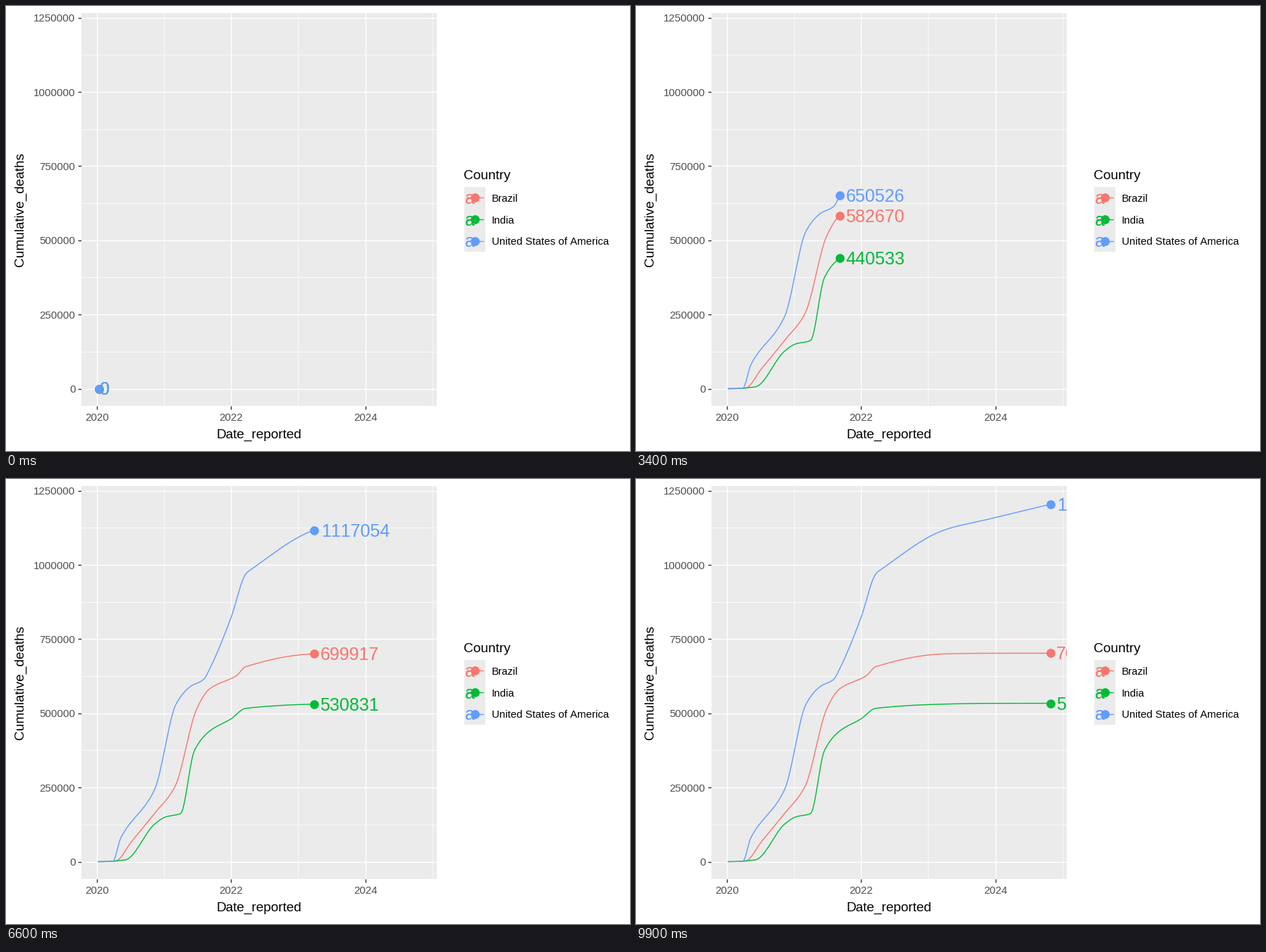
Animation of 885x632 px, one loop 10000 ms. Source, as a matplotlib script:

```python
import matplotlib.pyplot as plt
import numpy as np
from matplotlib.animation import FuncAnimation

W, H, DPI = 885, 632, 100
FRAMES, INTERVAL = 100, 100
LEFT, RIGHT, TOP, BOTTOM = 107, 610.5, 9.5, 568
X_2020, YEAR = 129.0, 95.15
Y_ZERO, Y_STEP = 543.5, 105.4
START, END, WEEK = 130.4, 587.5, 1.823
HEAD_0, SPEED = 132.0, 46.2
SMALL, MEDIUM, LARGE, DOT = 15, 19, 25, 12.7

plt.rcParams["font.family"] = "Liberation Sans"
plt.rcParams["text.kerning_factor"] = 6

# Key points per country: (seconds into the loop, thousands of deaths)
COUNTRIES = [
    ("Brazil", "#F8766D", [
        (0, 0), (0.5, 2), (1, 68), (1.7, 162.015), (2.33, 253), (3, 515),
        (3.4, 582.67), (4.22, 627), (4.5, 656.798), (6.6, 699.917),
        (7.9, 702.116), (9.9, 702.2)]),
    ("India", "#00BA38", [
        (0, 0), (0.8, 6), (1.7, 126.121), (2.05, 151), (2.5, 162),
        (2.93, 375), (3.4, 440.533), (4.05, 481), (4.5, 516.479),
        (6.6, 530.831), (7.9, 533.295), (9.9, 533.6)]),
    ("United States of America", "#619CFF", [
        (0, 0), (0.42, 1), (0.67, 81), (1.7, 241.719), (2.36, 530),
        (2.8, 590), (3.2, 613), (3.4, 650.526), (4.05, 822), (4.5, 968.691),
        (4.7, 987), (6.6, 1117.054), (7.9, 1152.08), (9.9, 1205)]),
]


def monotone(points):
    """Rising cubic curve through the points, flat before the first."""
    x, y = np.array(points, float).T
    h = np.diff(x)
    d = np.diff(y) / h
    mean = 2 * d[:-1] * d[1:] / (d[:-1] + d[1:])
    m = np.concatenate(([0], mean, [d[-1]]))

    def curve(q):
        q = np.clip(q, x[0], x[-1])
        i = np.clip(np.searchsorted(x, q) - 1, 0, len(h) - 1)
        t = (q - x[i]) / h[i]
        s = 1 - t
        return (s * s * (1 + 2 * t) * y[i] + t * t * (3 - 2 * t) * y[i + 1]
                + h[i] * t * s * (s * m[i] - t * m[i + 1]))

    return curve


def pt(px):
    return px * 72 / DPI


def to_y(thousands):
    return Y_ZERO - thousands / 250 * Y_STEP


fig = plt.figure(figsize=(W / DPI, H / DPI), dpi=DPI, facecolor="white")


def pixel_axes(left, right, top, bottom):
    ax = fig.add_axes([left / W, 1 - bottom / H,
                       (right - left) / W, (bottom - top) / H])
    ax.set(xlim=(left, right), ylim=(bottom, top), xticks=[], yticks=[])
    for spine in ax.spines.values():
        spine.set_visible(False)
    return ax


page = pixel_axes(0, W, 0, H)
panel = pixel_axes(LEFT, RIGHT, TOP, BOTTOM)
panel.set_facecolor("#EBEBEB")


def segment(ax, xs, ys, color, px=1.4, z=2):
    return ax.plot(xs, ys, color=color, lw=pt(px), zorder=z,
                   solid_capstyle="butt")[0]


def write(ax, x, y, s, px, color="black", **kw):
    return ax.text(x, y, s, fontsize=pt(px), color=color, va="baseline", **kw)


def dot(ax, x, y, color, z):
    return ax.plot([x], [y], "o", ms=pt(DOT), mew=0, color=color, zorder=z)[0]


def draw_axes():
    for k in range(6):
        x = X_2020 + k * YEAR
        y = Y_ZERO - k * Y_STEP
        major = k % 2 == 0
        segment(panel, [x, x], [TOP, BOTTOM], "white", 1.4 if major else 0.8)
        segment(panel, [LEFT, RIGHT], [y, y], "white")
        if k < 5:
            mid = y - Y_STEP / 2
            segment(panel, [LEFT, RIGHT], [mid, mid], "white", 0.8, 1.5)
        segment(page, [102.3, LEFT + 0.5], [y, y], "#333333")
        write(page, 98.5, y + 5.8, str(k * 250000), SMALL, "#4D4D4D",
              ha="right")
        if major:
            segment(page, [x, x], [BOTTOM, 573], "#333333")
            write(page, x, 589, str(2020 + k), SMALL, "#4D4D4D", ha="center")
    write(page, 358.4, 614.2, "Date_reported", MEDIUM, ha="center")
    write(page, 24.6, 289, "Cumulative_deaths", MEDIUM, ha="center",
          rotation=90, rotation_mode="anchor")


def draw_legend():
    write(page, 648.8, 246.3, "Country", MEDIUM)
    page.add_patch(plt.Rectangle((649.5, 257), 30, 91.5, fc="#EBEBEB", lw=0))
    for k, (name, color, _) in enumerate(COUNTRIES):
        y = 272.3 + 30.6 * k
        write(page, 651.2, y + 9, "a", LARGE, color)
        segment(page, [652.5, 677], [y, y], color, z=4)
        dot(page, 664.5, y, color, 5)
        write(page, 689, y + 5.9, name, SMALL)


def make_series(rank, color, points):
    z = rank / 10
    line = segment(panel, [], [], color, z=4 + z)
    head = dot(panel, START, Y_ZERO, color, 5 + z)
    label = write(panel, 0, 0, "", LARGE, color, zorder=6 + z, clip_on=True)
    return monotone(points), line, head, label


draw_axes()
draw_legend()
series = [make_series(k, color, points)
          for k, (_, color, points) in enumerate(COUNTRIES)]


def update(i):
    x = min(HEAD_0 + SPEED * i * INTERVAL / 1000, END)
    xs = np.append(np.arange(START, x, WEEK), x)
    for curve, line, head, label in series:
        values = curve((xs - HEAD_0) / SPEED)
        ys = to_y(values)
        text = str(round(values[-1] * 1000))
        line.set_data(xs, ys)
        head.set_data([x], [ys[-1]])
        label.set_text(text)
        # Gap is a tenth of the label's width
        label.set_position((x + 0.0556 * LARGE * len(text), ys[-1] + 9))
    return [artist for s in series for artist in s[1:]]


anim = FuncAnimation(fig, update, frames=FRAMES, interval=INTERVAL,
                     repeat=True, repeat_delay=0, blit=False)
plt.show()
```
